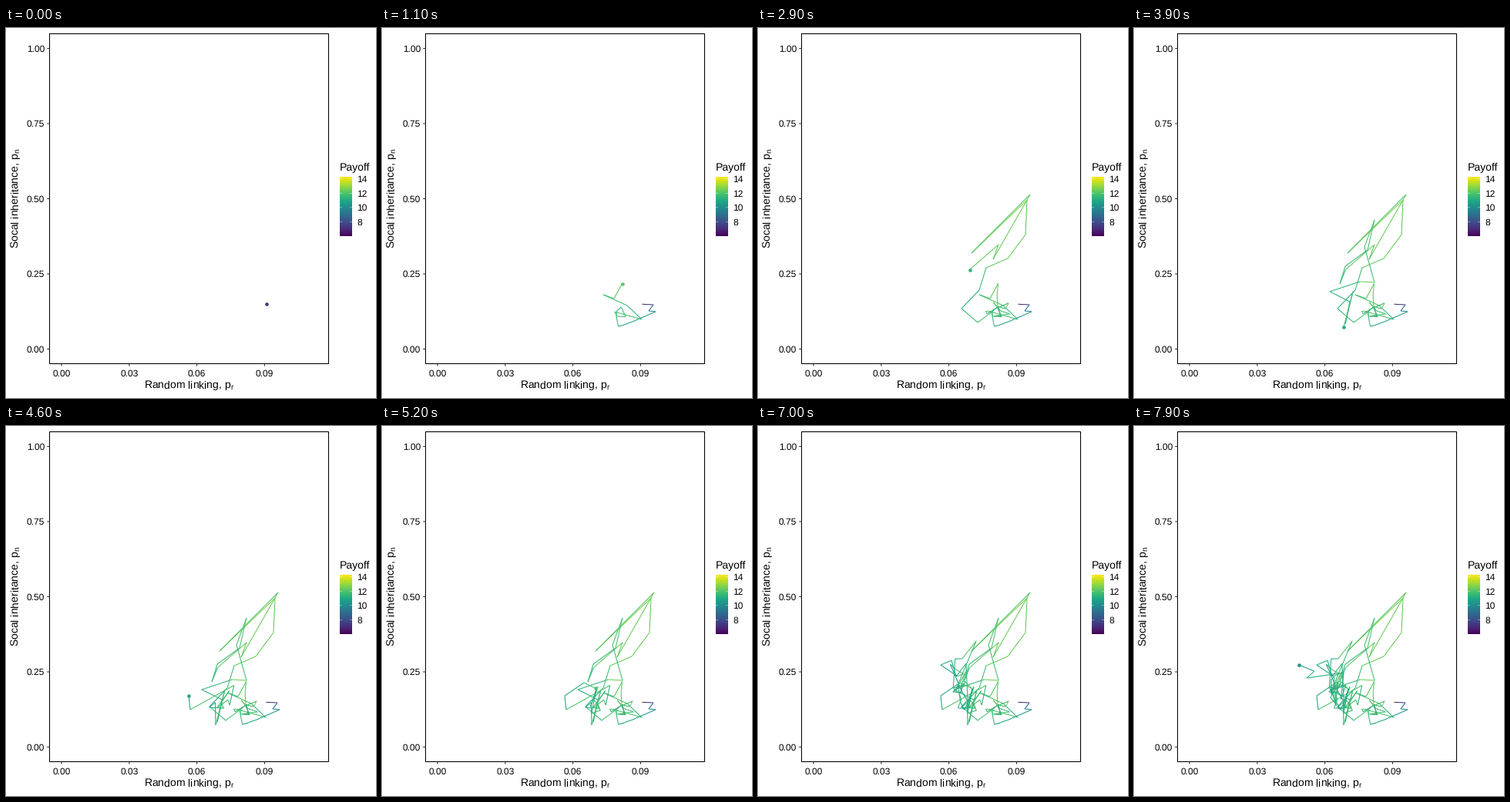
Recreate the animation shown at these times as a matplotlib script. Size 480 px wide and 480 px high, loop 8000 ms.

```python
import numpy as np
import matplotlib.pyplot as plt
from matplotlib.animation import FuncAnimation
from matplotlib.collections import LineCollection
from matplotlib.patches import Rectangle

SIZE, DPI, FRAMES, STEP = 480, 80, 80, 100
PX = 72 / DPI  # points per pixel
LOW, HIGH = 6.0, 14.3

plt.rcParams["font.family"] = "Liberation Sans"
plt.rcParams["text.hinting"] = "none"
plt.rcParams["path.snap"] = False
rng = np.random.default_rng(12)
cmap = plt.get_cmap("viridis")

fig = plt.figure(figsize=(SIZE / DPI, SIZE / DPI), dpi=DPI, facecolor="white")
ax = fig.add_axes([0, 0, 1, 1])
ax.set_xlim(0, SIZE)
ax.set_ylim(SIZE, 0)
ax.axis("off")


def sx(v):
    return 72 + 2928 * v


def sy(v):
    return 416.5 - 390 * v


def label(x, y, s, size=12, **kw):
    ax.text(x, y, s, fontsize=size * PX, color="black", va="baseline", **kw)


def rule(xs, ys, color="#333333", width=1.07):
    ax.plot(xs, ys, color=color, lw=width * PX, solid_capstyle="butt")


def draw_axes():
    ax.add_patch(Rectangle((56.5, 7.5), 362, 428, fill=False, ec="black", lw=1.07 * PX))
    for v in (0, 0.03, 0.06, 0.09):
        rule([sx(v)] * 2, [435.5, 438.7])
        label(sx(v), 452, f"{v:.2f}", ha="center")
    for v in (0, 0.25, 0.5, 0.75, 1):
        rule([53.3, 56.5], [sy(v)] * 2)
        label(50, sy(v) + 4, f"{v:.2f}", ha="right")
    label(238, 468, r"Random linking, p$\mathregular{_r}$", 14, ha="center")
    label(17, 221.5, r"Socal inheritance, p$\mathregular{_n}$", 14, ha="center",
          rotation=90, rotation_mode="anchor")


def draw_legend():
    left, right, top, bottom = 433, 449, 193, 270
    label(433.3, 185, "Payoff", 14)
    ramp = np.linspace(1, 0, 256)[:, None]
    ax.imshow(ramp, cmap=cmap, extent=(left, right, bottom, top), aspect="auto",
              interpolation="bilinear")
    for v in (8, 10, 12, 14):
        y = bottom - (v - LOW) / (HIGH - LOW) * (bottom - top)
        rule([left, left + 3], [y, y], "white", 0.4)
        rule([right - 3, right], [y, y], "white", 0.4)
        label(455, y + 4.2, str(v))


path = [(337.5, 358.3)]
keys = [(0, 0)]  # (frame, vertex index)


def go(end, *pts):
    """Walk through the given points, arriving at frame `end`."""
    path.extend(pts)
    keys.append((end, len(path) - 1))


def roam(end, n, x0, x1, y0, y1):
    """Wander n random steps inside a box."""
    p = np.array(path[-1])
    pts = []
    for _ in range(n):
        p = 0.45 * p + 0.55 * rng.uniform((x0, y0), (x1, y1))
        pts.append(tuple(np.clip(p, (x0, y0), (x1, y1))))
    go(end, *pts)


# first cluster
go(5, (352, 359), (346, 367), (355, 368), (325, 381), (311, 386))
roam(9, 7, 296, 324, 354, 390)
go(11, (337, 378), (318, 360), (287, 346), (301, 351), (311.5, 331.5))
roam(17, 13, 287, 340, 344, 378)
# long climb and return
go(29, (304, 368), (285, 382), (264, 364), (287, 340), (296, 311), (324, 299),
   (347, 268), (349, 223), (277, 292), (353, 216), (305, 300), (312, 281),
   (274.5, 313.5))
# second climb, then down
go(39, (267, 332), (274, 309), (303, 288), (312, 249), (299, 284), (312, 330),
   (293, 329), (254, 342), (280, 355), (274, 384), (284, 342), (272, 388))
# drift to the left
roam(44, 10, 248, 303, 309, 388)
go(47, (239, 368), (237, 350), (262, 333))
roam(58, 20, 252, 296, 310, 384)
go(61, (270, 308), (257, 325), (251, 304), (237, 310))
roam(67, 11, 243, 282, 298, 370)
go(68, (283, 279))
roam(76, 16, 246, 288, 302, 378)
go(79, (272, 320), (224, 327), (234, 318), (214, 310))

path = np.array(path)
order = np.arange(len(path))


def payoffs():
    x = (path[:, 0] - 72) / 2928
    y = (416.5 - path[:, 1]) / 390
    p = 11.9 + 50 * np.minimum(x - 0.08, 0) + 1.5 * (y - 0.12)
    p += rng.normal(0, 0.3, len(p)) * (order > 4)
    return p - 4.7 * np.exp(-order / 2.5)


colors = cmap((payoffs() - LOW) / (HIGH - LOW))

draw_axes()
draw_legend()
trail = LineCollection([], linewidths=1.07 * PX, capstyle="butt", zorder=3)
ax.add_collection(trail)
dot = ax.scatter([path[0, 0]], [path[0, 1]], s=(4.6 * PX) ** 2, linewidths=0, zorder=4)
key_frames, key_index = zip(*keys)


def update(frame):
    pos = np.interp(frame, key_frames, key_index)
    i = int(pos)
    j = min(i + 1, len(path) - 1)
    tip = path[i] + (pos - i) * (path[j] - path[i])
    pts = np.vstack([path[:i + 1], tip])
    trail.set_segments(np.stack([pts[:-1], pts[1:]], axis=1) if frame else [])
    trail.set_color(colors[:i + 1])
    dot.set_offsets([tip])
    dot.set_facecolor([colors[i]])
    return trail, dot


anim = FuncAnimation(fig, update, frames=FRAMES, interval=STEP, repeat=True,
                     repeat_delay=0, blit=False)
plt.show()
```
